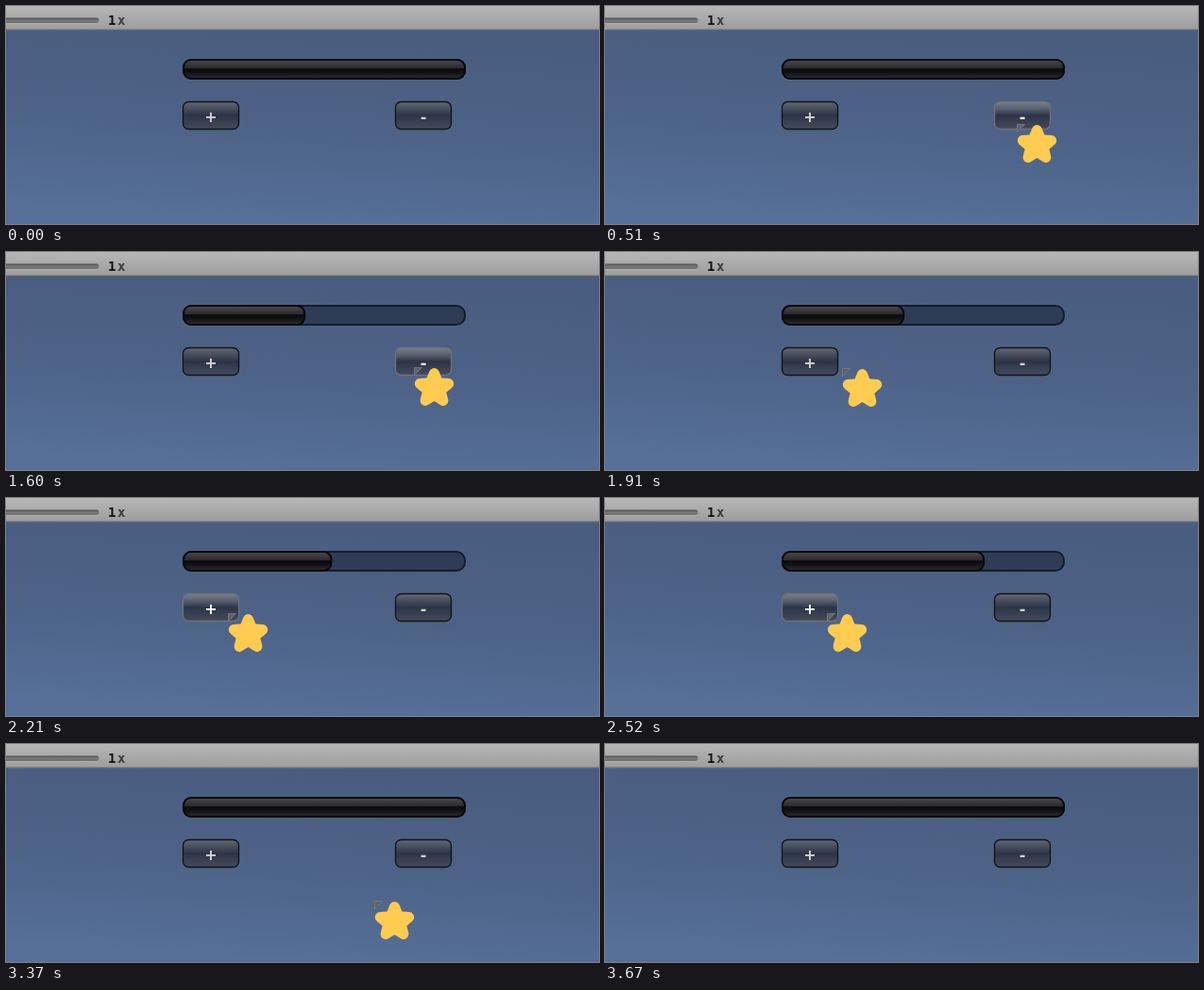
An HTML page with a canvas for the animation above (4150 ms loop, 628 px wide and 231 px high).

```html
<!DOCTYPE html>
<html>
<head>
<meta charset="utf-8">
<title>Health bar</title>
<style>
html, body { margin: 0; width: 100%; height: 100%; overflow: hidden; background: #4f648a; }
canvas { display: block; }
</style>
</head>
<body>
<canvas id="stage" width="628" height="231"></canvas>
<script>
const ctx = document.getElementById('stage').getContext('2d');
const LOOP = 4150;
const TICK = 73.3;  // pointer update interval
const TAP = 170;    // time from one click to the next
const HELD = 75;    // how long a click stays down
const BAR = { x: 187, y: 56, w: 300, h: 22, min: 17 };
const PLUS = { x: 187, y: 101, label: '+', first: 2140, taps: 7 };
const MINUS = { x: 412, y: 101, label: '-', first: 740, taps: 6 };

// Each glide follows a quadratic curve in even steps, then rests at its end.
const GLIDES = [
  { start: 70, steps: 7, from: [490, 208], via: [443, 127], to: [432, 122] },
  { start: 1680 - TICK, steps: 5, from: [432, 122], via: [260, 125], to: [235, 122] },
  { start: 3370, steps: 3, from: [390, 166], via: [500, 188], to: [531, 222] }
];
const POINTER_GONE = 3665;

const clamp = (v, lo, hi) => Math.max(lo, Math.min(hi, v));

function pointerAt(t) {
  const glide = GLIDES.findLast(g => t >= g.start);
  if (!glide || t >= POINTER_GONE) return null;
  const { start, steps, from, via, to } = glide;
  const u = Math.min(1, Math.floor((t - start) / TICK) / steps);
  const v = 1 - u;
  return from.map((a, i) => v * v * a + 2 * u * v * via[i] + u * u * to[i]);
}

function tapsDone(b, t) {
  return clamp(Math.floor((t - b.first) / TAP) + 1, 0, b.taps);
}

const isDown = (b, t) => tapsDone(b, t + HELD) > tapsDone(b, t);

function vertical(y, h, stops) {
  const g = ctx.createLinearGradient(0, y, 0, y + h);
  for (const [at, color] of stops) g.addColorStop(at, color);
  return g;
}

function rounded(x, y, w, h, r, fill, stroke, line = 1) {
  ctx.beginPath();
  ctx.roundRect(x, y, w, h, r);
  ctx.fillStyle = fill;
  ctx.fill();
  if (!stroke) return;
  ctx.strokeStyle = stroke;
  ctx.lineWidth = line;
  ctx.stroke();
}

function drawSky() {
  const g = ctx.createLinearGradient(320, 26, 307, 231);
  g.addColorStop(0, '#495d80');
  g.addColorStop(0.5, '#4d6286');
  g.addColorStop(1, '#567099');
  ctx.fillStyle = g;
  ctx.fillRect(0, 0, 628, 231);
}

function drawToolbar() {
  ctx.fillStyle = vertical(0, 25, [[0, '#b7b7b7'], [1, '#9d9d9d']]);
  ctx.fillRect(0, 0, 628, 25);
  ctx.fillStyle = '#74767a';
  ctx.fillRect(0, 24.5, 628, 1);
  rounded(-8, 13, 106.5, 6, 3, '#b0b0b0');
  rounded(-8, 12.5, 106.5, 5.5, 2.7,
    vertical(12.5, 5.5, [[0, '#4c4c4c'], [0.5, '#7a7a7a'], [1, '#6a6a6a']]));
  ctx.font = 'bold 14px "DejaVu Sans Mono", monospace';
  ctx.textAlign = 'left';
  ctx.fillStyle = '#111';
  ctx.fillText('1', 108, 20);
  ctx.fillStyle = '#3c3c3c';
  ctx.fillText('x', 118, 20);
}

function drawBar(value) {
  const { x, y, w, h, min } = BAR;
  rounded(x + 1, y + 1, w - 2, h - 2, 9, '#2e3d55', '#161c28', 2);
  const fw = min + (w - min) * value;
  rounded(x, y, fw, h, 9, '#070708');
  rounded(x + 2, y + 2, fw - 4, h - 4, 7, vertical(y + 2, h - 4, [
    [0, '#48484b'], [0.42, '#2b2b2e'], [0.48, '#0c0c0e'],
    [0.65, '#0e0e10'], [1, '#29292c']
  ]));
}

function drawButton({ x, y, label }, hover, down) {
  const lit = hover && !down;
  const top = down ? '#343b4b' : hover ? '#7d828c' : '#646973';
  rounded(x + 0.5, y + 0.5, 59, 29, 6, vertical(y, 30, [
    [0, top], [0.3, lit ? '#535a69' : '#434957'],
    [0.5, '#2c3448'], [1, '#454c5b']
  ]), hover ? '#6c717b' : '#101319', 1.3);
  ctx.font = 'bold 16px "DejaVu Sans", sans-serif';
  ctx.textAlign = 'center';
  ctx.fillStyle = hover ? '#fffdf2' : '#d4d5d3';
  ctx.fillText(label, x + 30, y + 21.5);
}

function drawPointer(x, y) {
  ctx.beginPath();
  ctx.moveTo(x + 0.5, y + 0.5);
  ctx.lineTo(x + 8.5, y + 0.5);
  ctx.lineTo(x + 0.5, y + 8.5);
  ctx.closePath();
  ctx.fillStyle = '#5f636a';
  ctx.fill();
  ctx.strokeStyle = '#7a7c80';
  ctx.lineWidth = 0.8;
  ctx.stroke();

  ctx.beginPath();
  for (let i = 0; i < 10; i++) {
    const a = i * Math.PI / 5;
    const r = i % 2 ? 7 : 16;
    ctx.lineTo(x + 21.5 + r * Math.sin(a), y + 22.5 - r * Math.cos(a));
  }
  ctx.closePath();
  ctx.fillStyle = ctx.strokeStyle = '#ffcb50';
  ctx.lineWidth = 11;
  ctx.lineJoin = 'round';
  ctx.fill();
  ctx.stroke();
  ctx.lineJoin = 'miter';
}

function inside(b, [x, y]) {
  return x >= b.x && x < b.x + 60 && y >= b.y && y < b.y + 30;
}

function render(t) {
  const pointer = pointerAt(t);
  const tenths = 10 - tapsDone(MINUS, t) + tapsDone(PLUS, t);
  drawSky();
  drawToolbar();
  drawBar(Math.min(10, tenths) / 10);
  for (const b of [PLUS, MINUS]) {
    const hover = pointer !== null && inside(b, pointer);
    drawButton(b, hover, hover && isDown(b, t));
  }
  if (pointer) drawPointer(...pointer.map(Math.round));
}

const start = performance.now();
function tick() {
  render((performance.now() - start) % LOOP);
  requestAnimationFrame(tick);
}
tick();
</script>
</body>
</html>
```
